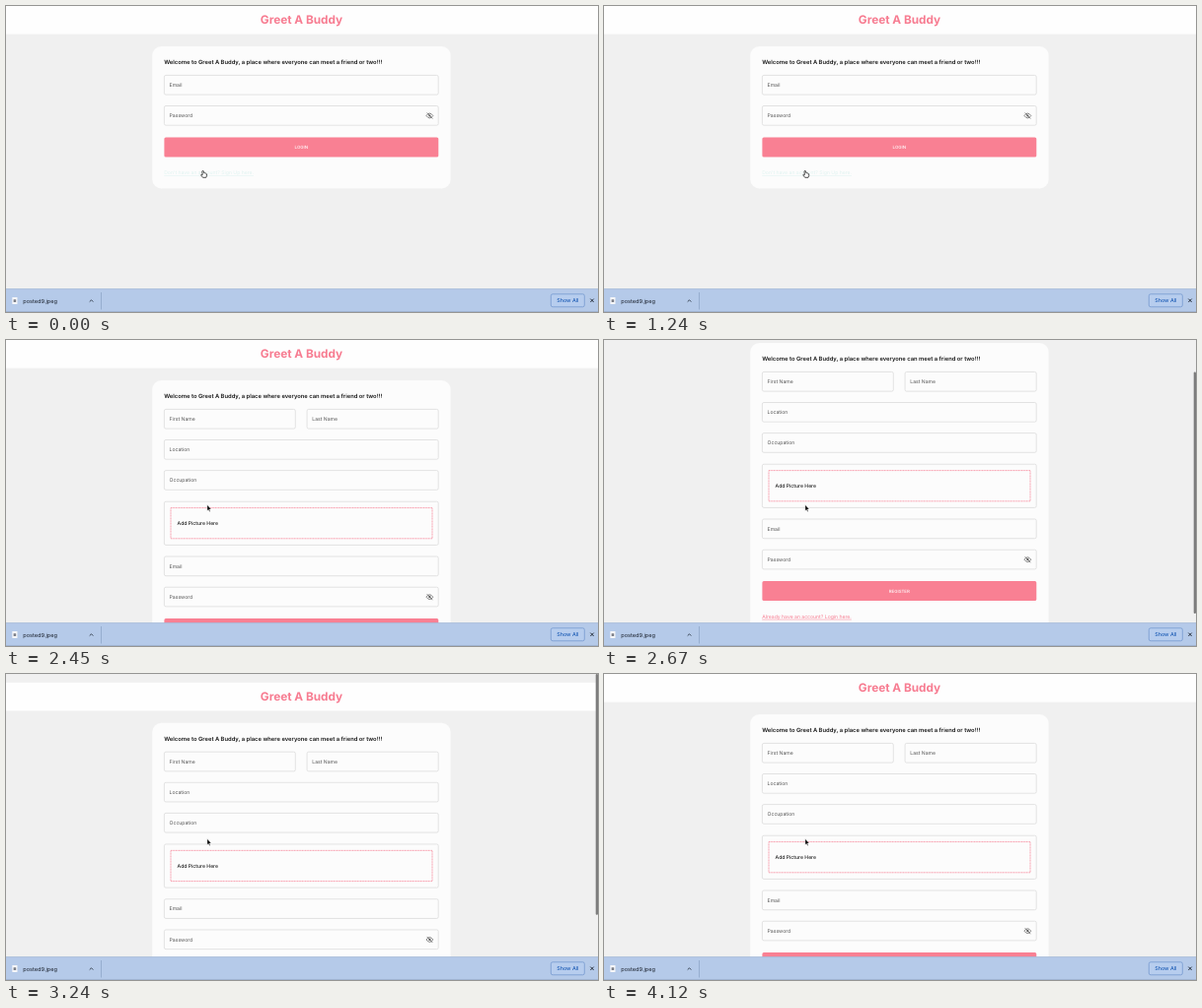
Animation of 600x311 px, one loop 4.15 s. Source, as an HTML page:

```html
<!DOCTYPE html>
<html lang="en">
<head>
<meta charset="utf-8">
<title>Greet A Buddy</title>
<style>
  html, body { margin: 0; width: 100%; height: 100%; overflow: hidden; background: #f0f0f0; }
  svg { display: block; width: 100vw; height: 100vh; }
  text { font: 5.1px Inter, Roboto, sans-serif; fill: #555; text-rendering: geometricPrecision; }
  .title { font-size: 11.8px; font-weight: 700; fill: #f77c91; text-anchor: middle; }
  .welcome { font-size: 5.84px; font-weight: 600; fill: #161616; }
  .dark { fill: #1c1c1c; font-weight: 500; }
  .caption { font-size: 4.4px; font-weight: 500; fill: #fff; text-anchor: middle; }
  .link { fill: #f77c91; text-decoration: underline; }
  .link.hover { fill: #e0f3f1; }
  .button { fill: #f98093; }
  .button.hover { fill: #fa8798; }
  .field { fill: #fcfcfc; stroke: #d2d2d2; stroke-width: .6; }
  .field.hover { stroke: #333; }
  .file { font-size: 5.6px; fill: #1a212c; }
  .show { font-size: 5.35px; font-weight: 500; fill: #1b5bb5; text-anchor: middle; }
  .pointer { fill: #fff; stroke: #222; stroke-width: .8; stroke-linejoin: round; }
</style>
</head>
<body>
<svg id="stage" viewBox="0 0 600 311" preserveAspectRatio="none"></svg>
<script>
const LOOP = 4150, SWITCH = 1760, MAX_SCROLL = 49, VIEW = 287.4;

const text = (x, y, cls, str, id = '') => `<text x="${x}" y="${y}" class="${cls}" id="${id}">${str}</text>`;
const rect = (x, y, w, h, r, attrs) => `<rect x="${x}" y="${y}" width="${w}" height="${h}" rx="${r}" ${attrs}/>`;
const field = (y, label, x = 160.4, w = 277.8, id = '') =>
  rect(x, y, w, 19.7, 1.6, `class="field" id="${id}"`) + text(x + 5.2, y + 11.6, '', label);
const eye = y => `<g transform="translate(429.4 ${y})" fill="none" stroke="#555" stroke-width=".7">
  <path d="M-3.4 0Q0-4.8 3.4 0Q0 4.8-3.4 0Z"/><circle r="1.1" fill="#555" stroke="none"/>
  <path d="M-2.7-3L2.9 3"/></g>`;
const button = (y, label, id) =>
  rect(160.4, y, 277.9, 20, 1.6, `class="button" id="${id}"`) + text(299.3, y + 11.6, 'caption', label);
const card = h => rect(148.3, 41, 302.3, h, 9, 'fill="#fcfcfc"') +
  text(160.2, 59.2, 'welcome', 'Welcome to Greet A Buddy, a place where everyone can meet a friend or two!!!');

const loginPage = card(144.5) + field(70.4, 'Email') +
  field(101.5, 'Password', 160.4, 277.8, 'password') + eye(111.5) +
  button(133.5, 'LOGIN', 'login') +
  text(160.2, 171.3, 'link', 'Don\'t have an account? Sign Up here.', 'signup');

const registerPage = card(295.5) +
  field(70.4, 'First Name', 160.4, 132.9) + field(70.4, 'Last Name', 305.1, 133.1) +
  field(101.5, 'Location') + field(132.6, 'Occupation') +
  rect(160.4, 164.2, 277.8, 44.2, 1.6, 'class="field"') +
  rect(167, 170.6, 265, 31.2, 0, 'fill="none" stroke="#f77c91" stroke-width=".7" stroke-dasharray="1.2 .4"') +
  text(173.6, 188.1, 'dark', 'Add Picture Here') +
  field(220, 'Email') + field(251.2, 'Password') + eye(261.2) +
  button(283.1, 'REGISTER', 'register') +
  text(160.2, 320.8, 'link', 'Already have an account? Login here.');

const downloadBar = rect(0, VIEW, 600, 24, 0, 'fill="#b5cae9"') +
  rect(0, VIEW, 600, .7, 0, 'fill="#a2b7d5"') +
  rect(0, 310.3, 600, .7, 0, 'fill="#9aadca"') +
  rect(6.3, 296, 5.2, 7, .5, 'fill="#f5f6f8"') + rect(7.6, 298.3, 2.6, 2.6, .3, 'fill="#7c7f88"') +
  text(17.3, 301.6, 'file', 'posted9.jpeg') +
  '<path d="M84.7 300.6L86.5 298.8L88.3 300.6" fill="none" stroke="#2d3745" stroke-width=".9"/>' +
  rect(96.2, 291, .6, 17.5, 0, 'fill="#839cbf"') +
  rect(552.3, 292.8, 34, 13, 1.8, 'fill="#b7cdee" stroke="#6c92cc" stroke-width=".7"') +
  text(569.3, 301.2, 'show', 'Show All') +
  '<path d="M592.3 297.6L595.7 301M595.7 297.6L592.3 301" stroke="#28313e" stroke-width="1"/>';

const cursors = `
  <path id="arrow" d="M0 0V6L1.4 4.8L2.3 6.8L3.2 6.4L2.3 4.4H4.1Z" fill="#000" stroke="#fff" stroke-width=".4"/>
  <path id="hand" class="pointer" d="M-.9.2Q-.1-.5.6.2L.9 2.1L2 2.2L3.1 2.6L3.8 3.2V5L3.1 6.7H-.2L-2.2 4.2Q-2 3.2-.5 4Z"/>
  <path id="beam" d="M-1.2-3Q0-3 0-2.2Q0-3 1.2-3M0-2.3V2.3M-1.2 3Q0 3 0 2.2Q0 3 1.2 3" fill="none" stroke="#222" stroke-width=".7"/>`;

document.getElementById('stage').innerHTML = rect(0, 0, 600, 311, 0, 'fill="#f0f0f0"') +
  `<g id="page">${rect(0, 0, 600, 28.6, 0, 'fill="#fefefe"')}${text(299.5, 18.2, 'title', 'Greet A Buddy')}
    <g id="loginPage">${loginPage}</g><g id="registerPage">${registerPage}</g></g>
  ${rect(597.7, 0, 2.3, 246, 1, 'id="thumb" fill="#7d7d7d"')}${downloadBar}<g id="cursor">${cursors}</g>`;

const el = id => document.getElementById(id);
const show = (id, on) => el(id).setAttribute('display', on ? 'inline' : 'none');
const hover = (id, on) => el(id).classList.toggle('hover', on);
const clamp = (v, lo, hi) => Math.min(hi, Math.max(lo, v));

// Eased interpolation through [time, value] keys.
function follow(keys, t) {
  const next = keys.findIndex(k => k[0] > t);
  if (next === 0) return keys[0][1];
  if (next < 0) return keys[keys.length - 1][1];
  const [t0, a] = keys[next - 1], [t1, b] = keys[next];
  const p = (t - t0) / (t1 - t0);
  return a + (b - a) * p * p * (3 - 2 * p);
}

const cursorX = [[150, 199.7], [400, 207], [700, 212.3], [1130, 203.2], [1240, 203.9]];
const cursorY = [[150, 167.6], [400, 112], [700, 143], [1130, 167.6]];
const scrollKeys = [[2470, 0], [2760, MAX_SCROLL], [2990, MAX_SCROLL], [3210, -9.1], [3480, 0]];

function draw(t) {
  const registering = t >= SWITCH;
  const x = follow(cursorX, t), y = follow(cursorY, t);
  const within = (top, bottom) => !registering && y >= top && y <= bottom;
  const onLink = within(166, 173), onButton = within(133.5, 153.5), onField = within(101.5, 121.3);
  show('loginPage', !registering);
  show('registerPage', registering);
  hover('signup', onLink);
  hover('login', onButton);
  hover('password', onField);

  el('cursor').setAttribute('transform', `translate(${x} ${y})`);
  show('hand', onLink || onButton);
  show('beam', onField);
  show('arrow', !onLink && !onButton && !onField);

  const scroll = follow(scrollKeys, t);
  const height = VIEW * VIEW / (VIEW + MAX_SCROLL) - Math.max(0, -scroll) * .1;
  el('page').setAttribute('transform', `translate(0 ${-scroll})`);
  el('thumb').setAttribute('y', clamp(scroll / MAX_SCROLL, 0, 1) * (VIEW - height));
  el('thumb').setAttribute('height', height);
  el('thumb').setAttribute('opacity', t < 2470 ? 0 : clamp((3900 - t) / 150, 0, 1));
}

function tick() {
  draw(performance.now() % LOOP);
  requestAnimationFrame(tick);
}
tick();
</script>
</body>
</html>
```
